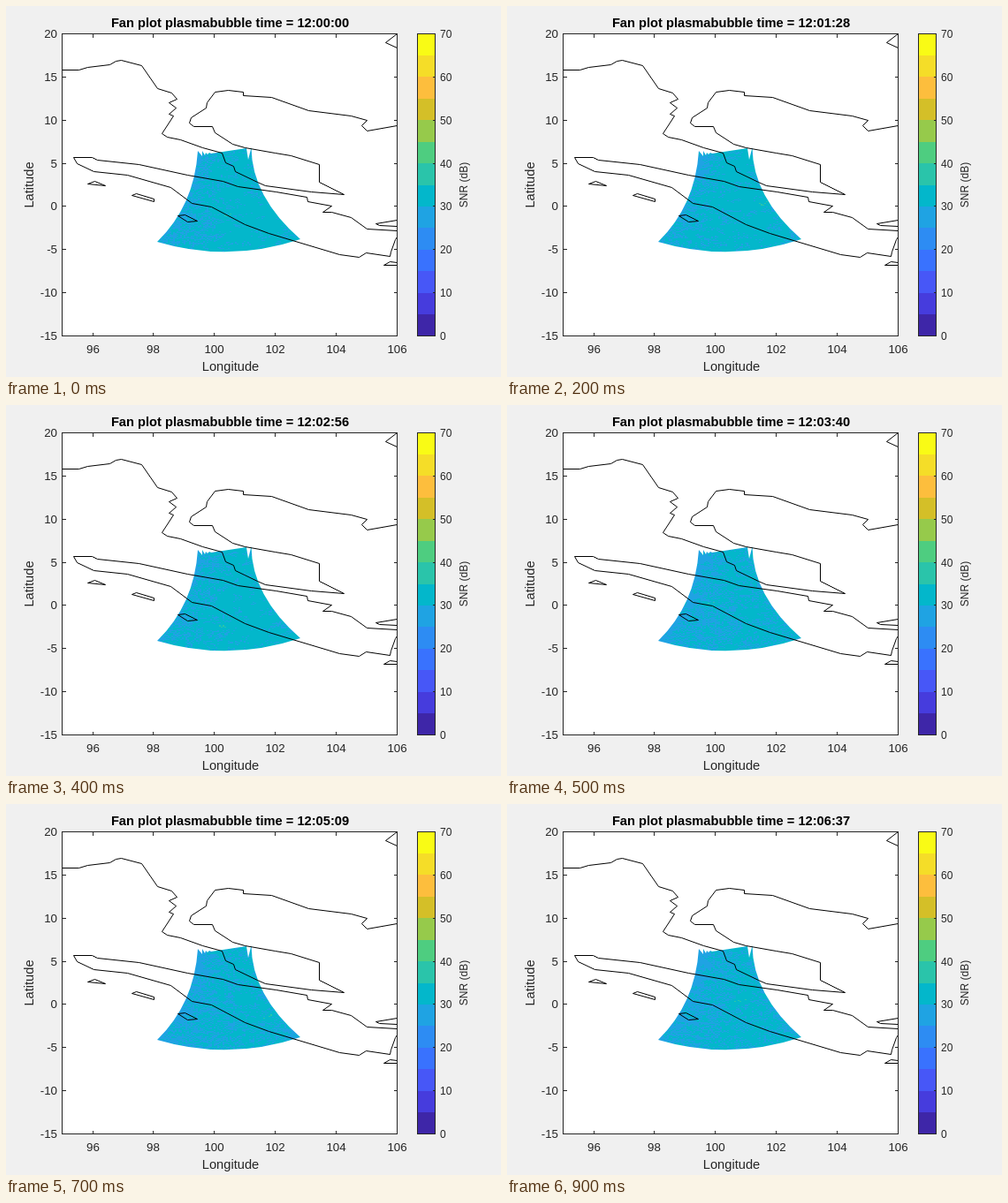
Write an HTML page with a canvas that moves like this. It is 560 by 420 pixels and loops after 1000 ms.

```html
<!DOCTYPE html>
<html lang="en">
<head>
<meta charset="utf-8">
<title>Fan plot</title>
<style>
html, body { margin: 0; width: 100%; height: 100%; overflow: hidden; background: #f0f0f0; }
canvas, svg { position: absolute; left: 0; top: 0; }
text { font-family: "Liberation Sans", Arial, sans-serif; font-size: 13.33px; fill: #262626; text-anchor: middle; }
.label { font-size: 14.67px; }
.title { font-size: 14.67px; font-weight: bold; fill: #000; }
.small { font-size: 12px; }
.coast { fill: none; stroke: #000; }
.axes { fill: none; stroke: #262626; shape-rendering: crispEdges; }
</style>
</head>
<body>
<canvas id="fan" width="560" height="420"></canvas>
<svg width="560" height="420">
  <g class="coast" transform="translate(.5 .5)">
    <path d="M63 72H82L92 69 117 66 124 62 130 61 153 67 171 93 187 98 193 105 184 109 192 115 184 122 189 124 176 144 182 148 197 151 222 160 244 166 248 177 257 181 259 187 284 199 293 203 345 210 382 213 354 199V179L322 169 304 166 270 160 256 156 236 143 233 136H212L207 132 209 126 226 115 227 109 236 97 251 95 268 97V101L300 103 342 118 390 124 408 129 402 135 408 141 442 135"/>
    <path d="M442 254L408 252 390 239 368 233H358L368 226 341 221 340 216 305 210 262 204 245 198 205 191 150 179 103 174 97 171H76L80 178 99 187 137 191 186 205 210 223 232 227 270 247 297 257 377 281 399 284 407 279 434 283 435 278 440 264 442 261"/>
    <path d="M442 242L418 246 422 248 442 249M442 293H427L434 289 442 290M442 31L429 41 442 47"/>
    <path d="M92 201L100 198 112 203ZM142 214L147 212 167 218V221ZM194 237L202 236 216 243 205 244Z"/>
  </g>
  <g id="bands" shape-rendering="crispEdges"></g>
  <path id="ticks" class="axes"/>
  <g id="labels"></g>
  <text class="label" x="254" y="413">Longitude</text>
  <text class="label" transform="translate(31 202.5) rotate(-90)">Latitude</text>
  <text class="small" transform="translate(522 202.5) rotate(-90)">SNR (dB)</text>
  <text class="title" id="title" x="253.5" y="24"></text>
</svg>
<script>
const $ = id => document.getElementById(id);
const ctx = $('fan').getContext('2d');
const colors = ['#3e26a8', '#463cdd', '#4757f7', '#3972fe', '#2d8cf3', '#1fa3e3', '#03b7cb',
  '#2ac4aa', '#4ecd80', '#96ca4b', '#d4bf28', '#fdbe3d', '#f5dd28', '#f9fb15'];
const fan = new Path2D(`M217 164L222 170V164L225 169 226 166 228 168 230 166 232 167
  272 161 274 174 277.5 160Q278 216 333 264Q252 291 171 267Q213 226 217 164Z`);
const left = 63.5, right = 442.5, top_ = 31.5, bottom = 373.5;
const height = bottom - top_;

function hash(x, y, k) {
  const s = Math.sin(x * 127.1 + y * 311.7 + k * 74.7) * 43758.5453;
  return s - Math.floor(s);
}

function smooth(x, y, k) {
  const i = Math.floor(x), j = Math.floor(y);
  const ease = t => t * t * (3 - 2 * t);
  const mix = (a, b, t) => a + (b - a) * t;
  const row = n => mix(hash(i, n, k), hash(i + 1, n, k), ease(x - i));
  return mix(row(j), row(j + 1), ease(y - j));
}

// Noisy signal, weaker on odd steps and at the sides, with one strong echo
function signal(x, y, k) {
  const half = 30 + Math.max(0, y - 175) ** 1.4 * .095;
  const dx = (x - 248) / half;
  const mean = k % 2 ? 30.4 : 31;
  const ex = 200 + 100 * hash(1, 2, k), ey = 222 + 35 * hash(3, 4, k);
  const echo = Math.exp(-(((x - ex) / 9) ** 2) - ((y - ey + (x - ex) * .2) / 3) ** 2);
  return mean + .8 * dx - 1.2 * dx ** 4
    + 2.2 * (smooth(x / 9, y / 4, k) - .5)
    + 2.8 * (hash(x, y, k) - .5)
    + 7 * echo * hash(y, x, k);
}

function drawFan(k) {
  ctx.fillStyle = '#fff';
  ctx.fillRect(left, top_, right - left, height);
  ctx.save();
  ctx.clip(fan);
  for (let y = 159; y < 280; y++)
    for (let x = 169; x < 336; x += 2) {
      ctx.fillStyle = colors[Math.floor(signal(x, y, k) / 5)];
      ctx.fillRect(x, y, 2, 1);
    }
  ctx.restore();
}

function buildAxes() {
  const box = (x1, x2) => `M${x1} ${top_}H${x2}V${bottom}H${x1}Z`;
  const snap = v => Math.floor(v) + .5;
  let d = box(left, right) + box(465.5, 485.5), labels = '';
  const label = (x, y, text, style = '') => labels += `<text x="${x}" y="${y}" ${style}>${text}</text>`;
  for (let i = 0; i < 8; i++) {
    const y = snap(top_ + height / 7 * i);
    d += `M${left} ${y}h4M${right} ${y}h-4M485.5 ${y}h-3`;
    label(58, y + 4.7, 20 - 5 * i, 'style="text-anchor:end"');
    label(491, y + 4.3, 70 - 10 * i, 'class="small" style="text-anchor:start"');
  }
  for (let i = 0; i < 6; i++) {
    const x = snap(98 + 68.9 * i);
    d += `M${x} ${bottom}v-4M${x} ${top_}v4`;
    label(x, 393, 96 + 2 * i);
  }
  $('ticks').setAttribute('d', d);
  $('labels').innerHTML = labels;
  const band = height / colors.length;
  $('bands').innerHTML = colors.map((c, i) =>
    `<rect x="465.5" y="${bottom - band * (i + 1)}" width="20" height="${band}" fill="${c}"/>`).join('');
}

let start, shown;
function play(now) {
  start ??= now;
  const k = Math.floor((now - start) % 1000 / 100);
  if (k !== shown) {
    shown = k;
    const s = Math.floor(44.17 * k), pad = n => String(n).padStart(2, '0');
    $('title').textContent = `Fan plot plasmabubble time = 12:${pad(Math.floor(s / 60))}:${pad(s % 60)}`;
    drawFan(k);
  }
  requestAnimationFrame(play);
}

buildAxes();
requestAnimationFrame(play);
</script>
</body>
</html>
```
